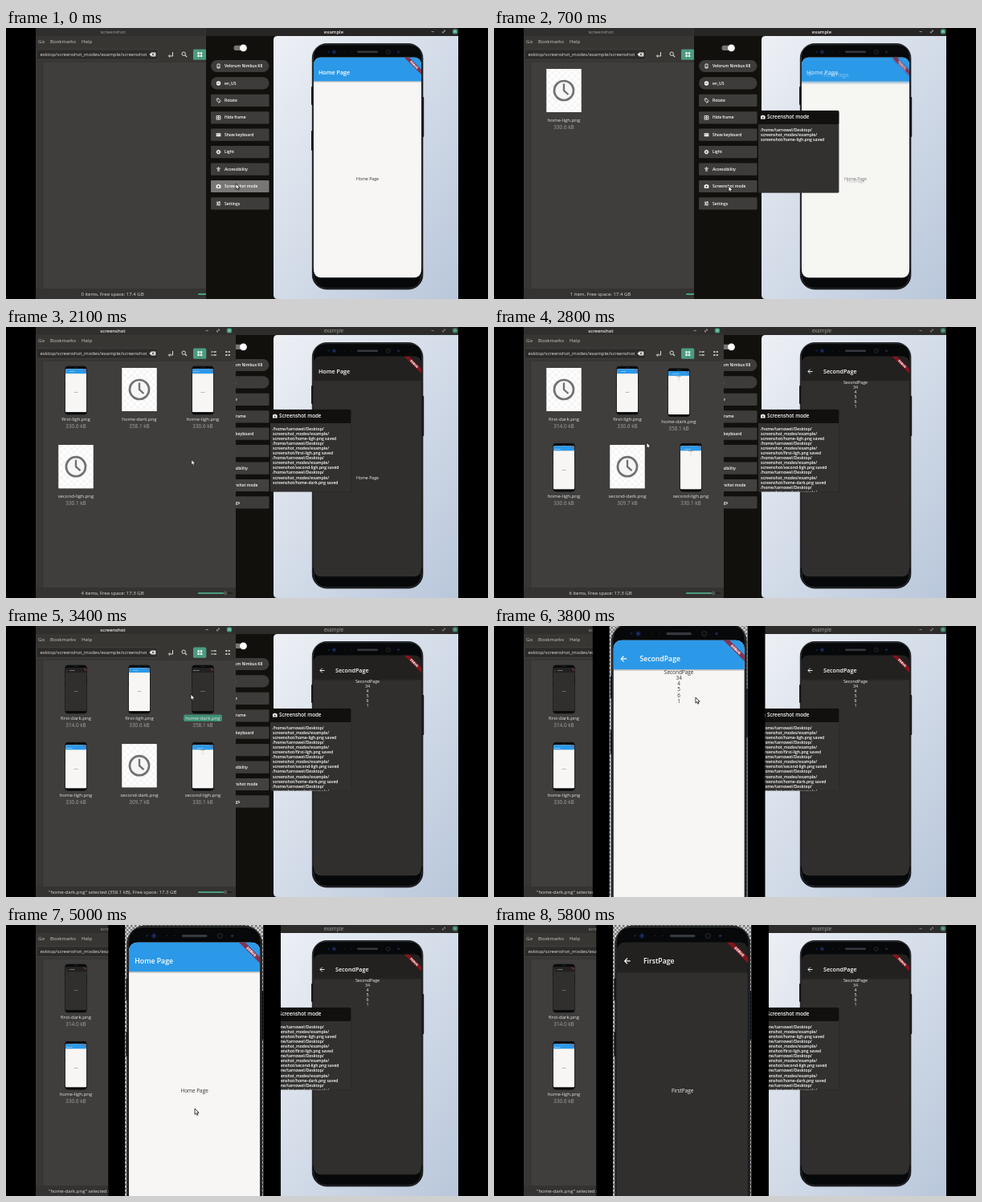
Recreate the animation shown at these times as an HTML page. Size 600 by 338 pixels, loop 5.9 s.

```html
<!DOCTYPE html>
<html lang="en">
<head>
<meta charset="utf-8">
<title>Screenshot mode</title>
<style>
html, body { margin: 0; width: 100%; height: 100%; overflow: hidden; background: #000; }
svg { display: block; width: 100vw; height: 100vh; }
text { font-family: "Open Sans", "Noto Sans", sans-serif; white-space: pre; }
</style>
</head>
<body>
<svg id="stage" viewBox="0 0 600 338"></svg>
<script>
const LOOP = 5900, STEP = 100;
const stage = document.getElementById('stage');

// Markup helpers; text is placed by its visual middle.
const text = (x, y, s, size, fill, extra = '') =>
  `<text x="${x}" y="${y + size * 0.34}" font-size="${size}" fill="${fill}" ${extra}>${s}</text>`;
const mid = 'text-anchor="middle"';
const bold = 'font-weight="600"';
const medium = 'font-weight="500"';
const rect = (x, y, w, h, fill, extra = '') =>
  `<rect x="${x}" y="${y}" width="${w}" height="${h}" fill="${fill}" ${extra}/>`;
const circle = (x, y, r, fill, extra = '') =>
  `<circle cx="${x}" cy="${y}" r="${r}" fill="${fill}" ${extra}/>`;
const line = (d, color, width, extra = '') =>
  `<path d="${d}" fill="none" stroke="${color}" stroke-width="${width}" ${extra}/>`;
const use = (id, extra = '') => `<use href="#${id}" ${extra}/>`;

const TITLES = { home: 'Home Page', first: 'FirstPage', second: 'SecondPage' };
const THEMES = {
  ligh: { bar: '#2b99e8', body: '#f7f6f4', ink: '#333' },
  dark: { bar: '#222120', body: '#302f2d', ink: '#f2f2f2' }
};

function screen(page, mode) {
  const c = THEMES[mode];
  const content = page === 'second'
    ? ['SecondPage', 34, 4, 5, 6, 1].map((s, i) => text(450, 69 + i * 6, s, 5.3, c.ink, `${mid} ${medium}`)).join('')
    : text(450, 188.5, TITLES[page], 5.25, c.ink, `${mid} ${medium}`);
  const back = page === 'home' ? '' : line('M396.6 55.5h-5.6M393.7 52.7L390.9 55.5l2.8 2.8', '#fff', 0.9);
  return `<g id="${page}-${mode}" clip-path="url(#glass)">
    ${rect(383, 36, 134, 276, c.body)}
    ${rect(383, 66, 134, 1.6, '#000', 'opacity=".22"')}
    ${rect(383, 36, 134, 30.3, c.bar)}
    ${back}${text(page === 'home' ? 389 : 410, 55.5, TITLES[page], 7.15, '#fff', bold)}
    ${content}
    <g transform="translate(517 37) rotate(45)">
      ${rect(-15, 10.4, 30, 4.5, '#a5101c', 'opacity=".75"')}
      ${text(0, 12.7, 'DEBUG', 3.7, '#fff', mid + ' font-weight="800"')}
    </g></g>`;
}

const phoneBody = `<g id="phone">
  ${rect(380, 73, 3, 23, '#15171b', 'rx="1"')}${rect(380, 128, 3, 25, '#15171b', 'rx="1"')}
  ${rect(517, 86, 3.2, 50, '#15171b', 'rx="1"')}
  ${rect(381.3, 19.5, 137.6, 306.4, '#070809', 'rx="18" stroke="#14161a" stroke-width=".8"')}
  ${line('M382.3 300V37Q382.5 20.8 398 20.6H502Q517.7 20.8 517.9 37V300', '#555a5c', 0.5)}
  ${line('M382.6 306Q383 324.6 400 324.8H500Q517 324.6 517.6 306', '#5b575a', 0.5)}
  ${rect(437, 28.4, 26, 2.7, '#343840', 'rx="1.3"')}
  ${circle(408.5, 29.8, 2.8, '#111836')}${circle(408.5, 29.8, 1.1, '#2a3a86')}
  ${circle(401.5, 29.8, 1.2, '#161d42')}
  ${circle(422, 29.8, 0.6, '#2b2b2b')}${circle(430, 29.8, 0.6, '#2b2b2b')}
  ${circle(476, 29.8, 2.6, '#0c0d10', 'stroke="#30333a" stroke-width=".6"')}
  ${circle(488.5, 29.8, 1.5, '#1b2848')}
</g>`;

const clock = `<g id="clock">
  ${rect(-21.5, -27, 43, 54, '#fff')}${rect(-21.5, -27, 43, 54, 'url(#pale)')}
  ${circle(0, 0, 12, '#f6f6f6', 'stroke="#707070" stroke-width="2.7"')}
  ${line('M0 -8.5V0L5.5 5', '#707070', 2.3)}</g>`;

const checker = (id, size, back, front) =>
  `<pattern id="${id}" width="${size * 2}" height="${size * 2}" patternUnits="userSpaceOnUse">
  ${rect(0, 0, size * 2, size * 2, back)}${rect(0, 0, size, size, front)}${rect(size, size, size, size, front)}</pattern>`;

const defs = `<defs>
  <clipPath id="glass"><rect x="383" y="36.5" width="134" height="275" rx="8.5"/></clipPath>
  <clipPath id="log"><rect x="329" y="120" width="100" height="85.5"/></clipPath>
  <linearGradient id="sky" x1="0" y1="0" x2="1" y2="1">
    <stop stop-color="#edf0f5"/><stop offset="1" stop-color="#b9c7db"/></linearGradient>
  ${checker('pale', 4, '#fff', '#f5f5f5')}${checker('alpha', 2.5, '#dadada', '#777')}
  ${phoneBody}${clock}
  ${Object.keys(TITLES).map(p => screen(p, 'ligh') + screen(p, 'dark')).join('')}
</defs>`;

function controls(x, active) {
  return `<g opacity="${active ? 1 : 0.75}">
    ${line(`M${x - 29.5} 4.6h3.4M${x - 15.5} 6l3-3m-1.6 0h1.6v1.6m-3-.2V6h1.6`, '#bbb', 0.7)}
    ${circle(x, 4.4, 3.2, '#3f9f82')}${line(`M${x - 1.2} 3.2l2.4 2.4m0-2.4l-2.4 2.4`, '#e8f5f0', 0.7)}</g>`;
}

// Sidebar entries: label and an icon drawn around its own centre.
const ico = (d) => line(d, '#fff', 0.8);
const camera = `<path d="M-2.8-1.7h1.4l.6-.8h1.6l.6.8h1.4v3.9h-5.6z" fill="#fff"/>${circle(0, 0.2, 1.1, '#444')}`;
const MENU = [
  ['Velorum Nimbus K8', ico('M-1.5-2.5h3v5h-3zM-1.5 1.6h3')],
  ['en_US', circle(0, 0, 2.7, '#fff') + line('M-1.7 0h3.4', '#444', 0.8)],
  ['Rotate', ico('M-2.2 0L0-2.2 2.2 0 0 2.2zM-2.7-1A3 3 0 0 1 0-2.8M2.7 1A3 3 0 0 1 0 2.8')],
  ['Hide frame', ico('M-2.4-2.3h4.8v4.6h-4.8zM0-2.3v4.6M-2.4 0h4.8')],
  ['Show keyboard', rect(-2.8, -2, 5.6, 4, '#fff', 'rx=".5"') + line('M-2-.8h4M-2 .3h4', '#444', 0.6, 'stroke-dasharray=".6 .5"')],
  ['Light', circle(0, 0, 2.4, '#fff', 'stroke="#fff" stroke-dasharray="1 .9"') + circle(0, 0, 1.1, '#444')],
  ['Accessibility', circle(0, -2.2, 0.7, '#fff') + ico('M-2.4-1h4.8M-.6-1v3.8M.6-1v3.8')],
  ['Screenshot mode', camera],
  ['Settings', ico('M-2.6-1.8h5.2M-2.6 0h5.2M-2.6 1.8h5.2M1-2.6v1.6M-1-.8v1.6M.6 1v1.6')]
];

function sidebar(glow) {
  return MENU.map(([label, icon], i) => {
    const y = 47.5 + i * 21.43;
    const shade = label === 'Screenshot mode' ? Math.round(66 + 54 * glow) : 61;
    return rect(255, y - 7.6, 72.5, 15.2, `rgb(${shade},${shade - 1},${shade - 3})`, `rx="${i < 2 ? 7.6 : 1}"`) +
      `<g transform="translate(264.5 ${y})">${icon}</g>` + text(272, y, label, 4.95, '#fff', bold);
  }).join('');
}

// Captures in the order they are saved: page, mode, time, size in kB.
const SHOTS = [
  ['home', 'ligh', 700, '330.6'], ['first', 'ligh', 1200, '330.6'], ['second', 'ligh', 1500, '330.1'],
  ['home', 'dark', 1900, '358.1'], ['first', 'dark', 2400, '314.0'], ['second', 'dark', 2700, '309.7']
].map(([page, mode, at, size]) => ({ name: `${page}-${mode}`, at, size }));
const THUMB_DELAY = 800;

// What the simulated phone and the viewer show, by start time.
const PAGES = [[-900, 'home-ligh'], [700, 'first-ligh'], [1100, 'second-ligh'], [1500, 'home-ligh'],
  [1800, 'home-dark'], [2300, 'first-dark'], [2600, 'second-dark']];
const VIEWS = [[3700, 'home-dark'], [3800, 'second-ligh'], [4300, 'first-dark'], [4600, 'first-ligh'],
  [4700, 'home-dark'], [4900, 'home-ligh'], [5200, 'second-dark'], [5400, 'second-ligh'], [5800, 'first-dark']];
const POINTER = [[0, 286, 194], [500, 292, 197], [1800, 292, 197], [2300, 190, 144], [2900, 190, 144],
  [3400, 230, 85], [3700, 232, 85], [3800, 251, 89], [3900, 251, 89], [4400, 235, 229],
  [5100, 235, 229], [5600, 335, 345], [LOOP, 335, 345]];
const RAISE = 2000, SELECT = 3400, OPEN = 3700, SETTLE = 4000;

const clamp = v => Math.max(0, Math.min(1, v));
const indexAt = (list, t) => list.findLastIndex(e => e[0] <= t);

function fileItem(shot, i, t) {
  // While the grid reflows, this slot is offset and still holds the previous picture.
  const moved = shot.name === 'home-dark' && t >= 2600 && t < 3000;
  const x = 87 + (i % 3) * 79 - (moved ? 15 : 0);
  const y = 78.5 + Math.floor(i / 3) * 96.2 + (moved ? 2.8 : 0);
  const ready = t >= shot.at + THUMB_DELAY;
  const picked = shot.name === 'home-dark' && t >= SELECT;
  const icon = ready
    ? `<g transform="translate(${x} ${y + 0.5}) scale(.197) translate(-450 -172.7)">
        ${use('phone')}${use(moved ? 'second-ligh' : shot.name)}</g>`
    : use('clock', `transform="translate(${x} ${y - 0.5})"`);
  return (picked ? rect(x - 24, y + 32, 48, 8.5, '#3f8f76', 'rx="2"') : '') + icon +
    text(x, y + 36.7, shot.name + '.png', 6.05, '#e4e4e2', mid) +
    text(x, y + 45.2, shot.size + ' kB', 6.4, '#a5a4a2', mid);
}

function fileWindow(t) {
  const active = t >= RAISE && t < OPEN;
  const files = SHOTS.filter(s => s.at <= t).sort((a, b) => a.name < b.name ? -1 : 1);
  const free = `, Free space: ${files.length > 3 ? 17.3 : 17.4} GB`;
  const n = files.length;
  const status = t >= SELECT
    ? text(53, 332, `"home-dark.png" selected (358.1 kB)${free}`, 6, '#dededc')
    : text(132.5, 332, `${n} item${n === 1 ? '' : 's'}${free}`, 6, '#dededc', mid);
  const menu = [[40, 'Go'], [55, 'Bookmarks'], [94, 'Help']];
  return rect(37, 0, 249, 338, '#3f3e3c') + rect(37, 0, 249, 43, '#373633') +
    rect(37, 0, 249, 10, '#302f2d') + rect(37, 43, 8.3, 282, '#383735') +
    rect(45, 43, 0.6, 282, '#2b2a28') + rect(37, 325, 249, 13, '#343331') +
    text(133, 5, 'screenshot', active ? 5.9 : 6.1, active ? '#f2f2f0' : '#a4a4a0', mid + (active ? ' ' + bold : '')) +
    controls(278, active) +
    menu.map(([x, s]) => text(x, 16.8, s, 6.1, '#cdcdc9')).join('') +
    rect(38, 26.8, 151, 12.6, '#2c2b29', 'rx="1.5" stroke="#55534f" stroke-width=".5"') +
    text(42.5, 32.9, 'esktop/screenshot_modes/example/screenshot', 6.03, '#e4e4e2') +
    `<path d="M178.5 33l2.4-2.6h5.4v5.2h-5.4z" fill="#e8e8e6"/>` + line('M181.7 31.6l2.8 2.8m0-2.8l-2.8 2.8', '#2c2b29', 0.8) +
    line('M207.5 30v5h-5m1.6-1.7l-1.7 1.7 1.7 1.7', '#ddd', 1) +
    circle(221.2, 32.2, 2.2, 'none', 'stroke="#ddd"') + line('M222.9 33.9l2.2 2.2', '#ddd', 1.2) +
    rect(233, 26.4, 16.3, 13.4, '#4b9b80', 'rx="1.5"') +
    [238.4, 241.8].map(x => [30.2, 33.6].map(y => rect(x, y, 2.4, 2.4, '#fff')).join('')).join('') +
    line('M255.5 31h1.8m1 0h3.5M255.5 35h1.8m1 0h3.5', '#ccc', 1.5) +
    line('M273.3 31h2m1.4 0h2M273.3 35h2m1.4 0h2', '#ccc', 1.8) +
    files.map((s, i) => fileItem(s, i, t)).join('') + status +
    rect(239, 331, 43, 2, '#262523', 'rx="1"') + rect(239, 331, 33, 2, '#4b9b80', 'rx="1"') +
    circle(273, 332, 2.4, '#55544f');
}

function dialog(t) {
  const saved = SHOTS.filter(s => s.at <= t);
  const lines = saved.flatMap(s =>
    ['/home/tarnowel/Desktop/', 'screenshot_modes/example/', `screenshot/${s.name}.png saved`]);
  return `<g opacity="${clamp((t - 200) / 200)}">
    ${rect(328.5, 102.5, 101.3, 103.5, '#000', 'opacity=".18" rx="2"')}
    ${rect(329, 103, 100.3, 102.5, '#323130', 'rx="1.5"')}${rect(329, 103, 100.3, 17, '#11100f', 'rx="1.5"')}
    <g transform="translate(334.8 111.3)">${camera}</g>
    ${text(340, 111.3, 'Screenshot mode', 6.25, '#fff', bold)}
    <g clip-path="url(#log)">${lines.map((s, i) => text(332, 127.3 + i * 6.05, s, 5.05, '#fff', bold)).join('')}</g></g>`;
}

function appWindow(t) {
  const active = t < RAISE;
  const i = indexAt(PAGES, t);
  const p = clamp((t - PAGES[i][0] + STEP) / 300);
  const page = (p < 1 ? use(PAGES[i - 1][1]) : '') +
    use(PAGES[i][1], `opacity="${p}" ${p < 1 ? `transform="translate(0 ${6 * (1 - p) ** 2})"` : ''}`);
  return rect(249, 0, 314, 338, '#11100d') + rect(249, 0, 314, 10, active ? '#272624' : '#2d2c2a') +
    text(408, 5, 'example', active ? 5.9 : 6.2, active ? '#f2f2f0' : '#a4a4a0', mid + (active ? ' ' + bold : '')) +
    controls(559, active) +
    `<path d="M563 10H338q-5 0-5 5V333q0 5 5 5H563z" fill="url(#sky)"/>` +
    rect(283.5, 21.8, 15, 6.2, '#777674', 'rx="3.1"') + circle(295.5, 24.9, 4.4, '#fff') +
    sidebar(1 - clamp((t - 100) / 500)) +
    use('phone') + `<g clip-path="url(#glass)">${page}</g>` + (t > 200 ? dialog(t) : '');
}

function viewer(t) {
  if (t < OPEN) return '';
  const shift = t < SETTLE ? 'translate(-4.5 -4)' : '';
  return `<g transform="${shift}">${rect(127.3, -5, 214.7, 360, '#000')}${rect(148.2, -5, 172, 360, 'url(#alpha)')}
    <g transform="translate(153 57.7) scale(1.2187) translate(-383 -66)">${use('phone')}${use(VIEWS[indexAt(VIEWS, t)][1])}</g></g>`;
}

function pointer(t) {
  const i = Math.min(indexAt(POINTER, t), POINTER.length - 2);
  const [t0, x0, y0] = POINTER[i], [t1, x1, y1] = POINTER[i + 1];
  const k = (t - t0) / (t1 - t0);
  return `<path transform="translate(${x0 + (x1 - x0) * k} ${y0 + (y1 - y0) * k})"
    d="M0 0V7.2L1.7 5.7 2.8 8.2 4 7.6 2.9 5.2H5.1z" fill="#fff" stroke="#111" stroke-width=".8"/>`;
}

stage.innerHTML = defs + '<g id="scene"></g>';
const scene = document.getElementById('scene');
let shown = -1;

function render(t) {
  const step = Math.floor(t / STEP) * STEP;
  if (step === shown) return;
  shown = step;
  const windows = [fileWindow(step), appWindow(step)];
  if (step >= RAISE) windows.reverse();
  scene.innerHTML = windows.join('') + viewer(step) + pointer(step);
}

const start = performance.now();
function tick() {
  render((performance.now() - start) % LOOP);
  requestAnimationFrame(tick);
}
tick();
</script>
</body>
</html>
```
